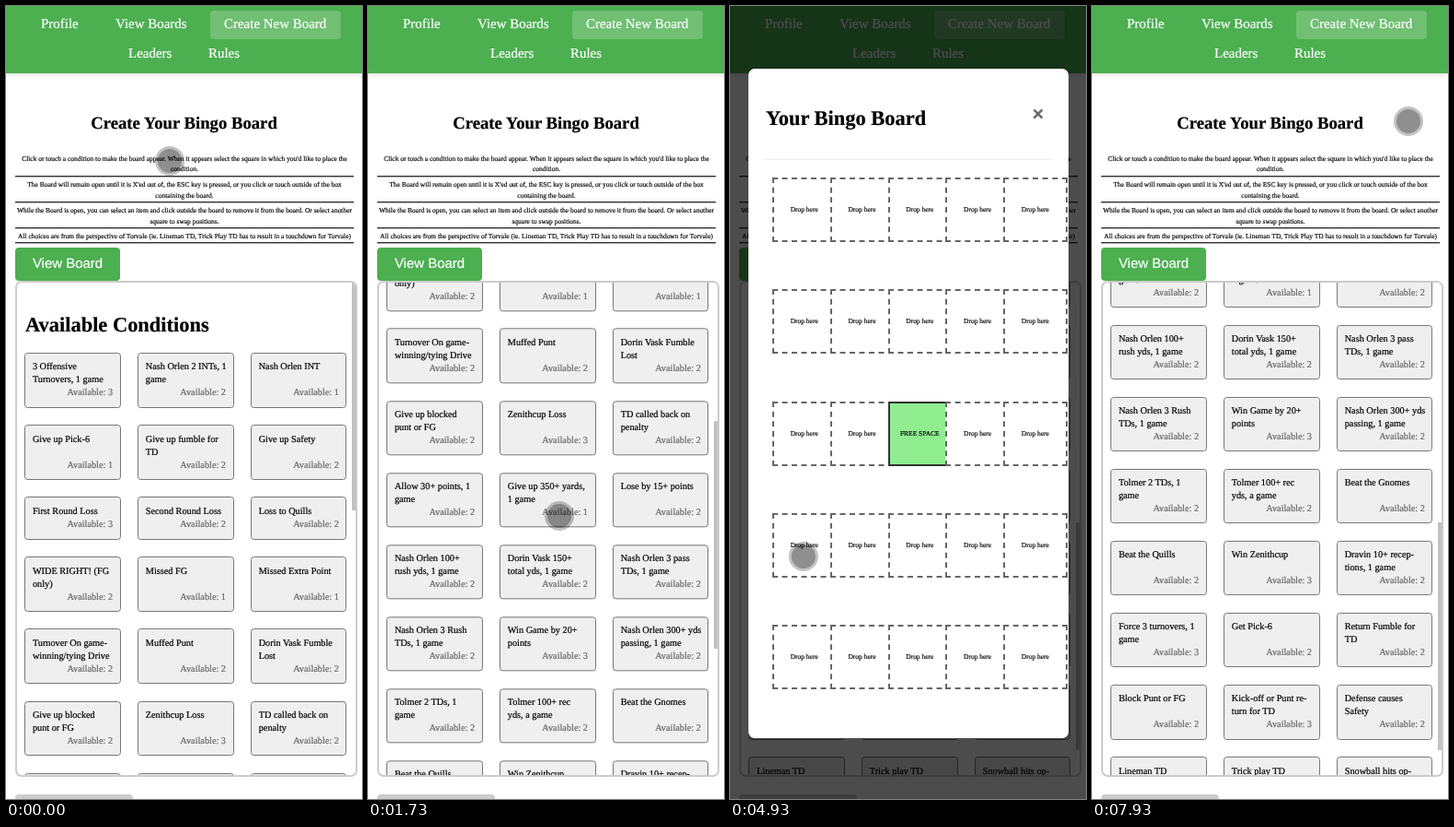
Recreate the animation shown at these times as an HTML page. Size 387x860 px, loop 8 s.

```html
<!DOCTYPE html>
<html lang="en">
<head>
<meta charset="utf-8">
<title>Bingo Board</title>
<style>
@property --scroll { syntax: '<number>'; inherits: true; initial-value: 0; }

* { box-sizing: border-box; margin: 0; padding: 0; }
html, body { width: 100%; height: 100%; overflow: hidden; background: #fff; }
body {
  position: relative;
  font-family: 'Liberation Serif', 'Times New Roman', serif;
  color: #000;
  text-rendering: geometricPrecision;
  -webkit-text-stroke: .2px;
}
#stage { position: absolute; left: 0; top: 0; width: 387px; height: 860px; overflow: hidden; }
#stage div, #stage nav, #stage nav a, #stage h1, #stage h2 { position: absolute; white-space: nowrap; }

nav {
  left: 0; top: 0; width: 387px; height: 73px;
  background: #4caf50; box-shadow: 0 2px 4px rgba(0,0,0,.12);
}
nav a { color: #fff; font-size: 14.96px; line-height: 20px; }
nav .active { left: 222px; top: 5px; width: 142px; height: 31px; border-radius: 4px; background: rgba(255,255,255,.2); }

h1 { left: 0; top: 116px; width: 387px; text-align: center; font-size: 18.7px; line-height: 24px; }
h2 { font-size: 22.44px; line-height: 28px; }

.intro { left: 10px; top: 159.6px; width: 368px; text-align: center; font-size: 7.48px; line-height: 11.7px; color: #111; }
.intro p { padding-bottom: .5px; border-bottom: 1px solid #333; box-shadow: 0 1px #aaa; margin-bottom: 3.3px; }

.view {
  left: 10px; top: 262px; width: 114px; height: 36px; border-radius: 4px;
  background: #4caf50; color: #fff; text-align: center;
  font: 14.96px/36px 'Liberation Sans', Arial, sans-serif;
}
.next { left: 10px; top: 855px; width: 128px; height: 36px; border-radius: 4px; background: #ccc; }

.list {
  left: 10px; top: 298px; width: 372px; height: 538px;
  border: 2px solid #ccc; border-radius: 7px; overflow: hidden;
  animation: scroll 8s infinite linear;
}
.items { left: 0; top: 0; transform: translateY(calc(var(--scroll) * -1px)); }
.items h2 { left: 9px; top: 32px; }
.thumb {
  left: 364px; top: 0; width: 4px; height: 247px; background: #c1c1c1;
  transform: translateY(calc(var(--scroll) * .461px));
}
.card {
  width: 104.6px; padding: 8.3px 0 0 7.8px;
  background: #efefef; border: 1px solid #767676; border-radius: 3.5px;
  font-size: 10.28px; line-height: 14px;
}
#stage .card { white-space: pre; }
.card div { right: 7.6px; bottom: 7.1px; color: #666; }

.overlay {
  left: 0; top: 0; width: 387px; height: 860px; background: rgba(0,0,0,.7);
  animation: modal 8s infinite step-end;
}
.modal { left: 20px; top: 68px; width: 348px; height: 726px; border-radius: 7px; background: #fff; }
.modal h2 { left: 19px; top: 40px; }
.close {
  left: 305px; top: 38px; width: 20px; text-align: center; color: #666;
  font: bold 21px/24px 'Liberation Sans', Arial, sans-serif;
}
.rule { left: 18px; top: 98px; width: 311px; height: 1px; background: #eee; }
.cell {
  width: 69.4px; height: 70px; border: 2px dashed #666; background: #fff;
  text-align: center; font-size: 7.48px; line-height: 66px; color: #111;
}
.free, .placed { border: 2px solid #333; }
.free { background: #90ee90; }
.placed { animation: place 8s infinite; }

.before { animation: before 8s infinite step-end; }
.after { position: absolute; right: 0; animation: after 8s infinite step-end; }

.pointer {
  left: -16px; top: -16px; width: 32px; height: 32px; border-radius: 50%;
  background: radial-gradient(circle, rgba(0,0,0,.44) 12.6px, rgba(0,0,0,.24) 13.4px);
  animation: pointer 8s infinite ease-in-out;
}

@keyframes scroll {
  0%, 15.625% { --scroll: 0; }
  21.625% { --scroll: 325; animation-timing-function: cubic-bezier(.33,.47,.67,1); }
  27.9%, 100% { --scroll: 564; }
}
@keyframes modal {
  0% { visibility: hidden; }
  52.45% { visibility: visible; }
  99.06%, 100% { visibility: hidden; }
}
@keyframes place {
  0%, 74.05% { opacity: 0; background: #fff; }
  74.06% { opacity: 1; background: #fff; }
  78%, 100% { opacity: 1; background: #add8e6; }
}
@keyframes before { 0% { opacity: 1; } 99.06%, 100% { opacity: 0; } }
@keyframes after { 0% { opacity: 0; } 99.06%, 100% { opacity: 1; } }
@keyframes pointer {
  0%, .4% { transform: translate(178px,168px); }
  5%, 11.2% { transform: translate(200px,554px); }
  14.1%, 16% { transform: translate(207px,552px); }
  21.6% { transform: translate(208px,553px); }
  28.4% { transform: translate(206px,557px); }
  35.9%, 41.2% { transform: translate(176px,705px); }
  44.1%, 61% { transform: translate(67px,607px); animation-timing-function: linear; }
  61.6% { transform: translate(79px,597px); animation-timing-function: cubic-bezier(.3,.2,.5,1); }
  68.5% { transform: translate(312px,583px); }
  71.6%, 82.9% { transform: translate(279px,595px); }
  92.5%, 100% { transform: translate(344px,125px); }
}
</style>
</head>
<body>
<div id="stage">
  <nav>
    <div class="active"></div>
    <a style="left:38px;top:10px">Profile</a>
    <a style="left:119px;top:10px">View Boards</a>
    <a style="left:237px;top:10px">Create New Board</a>
    <a style="left:133px;top:42px">Leaders</a>
    <a style="left:220px;top:42px">Rules</a>
  </nav>
  <h1>Create Your Bingo Board</h1>
  <div class="intro">
    <p>Click or touch a condition to make the board appear. When it appears select the square in which you'd like to place the<br>condition.</p>
    <p>The Board will remain open until it is X'ed out of, the ESC key is pressed, or you click or touch outside of the box<br>containing the board.</p>
    <p>While the Board is open, you can select an item and click outside the board to remove it from the board. Or select another<br>square to swap positions.</p>
    <p>All choices are from the perspective of Torvale (ie. Lineman TD, Trick Play TD has to result in a touchdown for Torvale)</p>
  </div>
  <div class="view">View Board</div>
  <div class="list">
    <div class="items"><h2>Available Conditions</h2></div>
    <div class="thumb"></div>
  </div>
  <div class="next"></div>
  <div class="overlay">
    <div class="modal">
      <h2>Your Bingo Board</h2>
      <div class="close">×</div>
      <div class="rule"></div>
    </div>
  </div>
  <div class="pointer"></div>
</div>
<script>
// One row per line; "|" breaks a label, "=" precedes the count.
const conditions = `
3 Offensive|Turnovers, 1 game=3; Nash Orlen 2 INTs, 1|game=2; Nash Orlen INT=1
Give up Pick-6=1; Give up fumble for|TD=2; Give up Safety=2
First Round Loss=3; Second Round Loss=2; Loss to Quills=2
WIDE RIGHT! (FG|only)=2; Missed FG=1; Missed Extra Point=1
Turnover On game-|winning/tying Drive=2; Muffed Punt=2; Dorin Vask Fumble|Lost=2
Give up blocked|punt or FG=2; Zenithcup Loss=3; TD called back on|penalty=2
Allow 30+ points, 1|game=2; Give up 350+ yards,|1 game=1; Lose by 15+ points=2
Nash Orlen 100+|rush yds, 1 game=2; Dorin Vask 150+|total yds, 1 game=2; Nash Orlen 3 pass|TDs, 1 game=2
Nash Orlen 3 Rush|TDs, 1 game=2; Win Game by 20+|points=3; Nash Orlen 300+ yds|passing, 1 game=2
Tolmer 2 TDs, 1|game=2; Tolmer 100+ rec|yds, a game=2; Beat the Gnomes=2
Beat the Quills=3; Win Zenithcup=3; Dravin 10+ recep-|tions, 1 game=2
Force 3 turnovers, 1|game=3; Get Pick-6=2; Return Fumble for|TD=2
Block Punt or FG=2; Kick-off or Punt re-|turn for TD=3; Defense causes|Safety=2
Lineman TD=2; Trick play TD=2; Snowball hits op-|posing player=2`;

const picked = 'Beat the Quills';
const gap = 18.7;

function add(parent, className, left, top, text) {
  const el = document.createElement('div');
  el.className = className;
  el.style.left = left + 'px';
  el.style.top = top + 'px';
  el.textContent = text;
  parent.append(el);
  return el;
}

const items = document.querySelector('.items');
let rowTop = 76.2;
for (const line of conditions.trim().split('\n')) {
  const height = line.includes('|') ? 59.4 : 46.2;
  line.split('; ').forEach((item, col) => {
    const [label, count] = item.split('=');
    const card = add(items, 'card', 8.1 + 122.9 * col, rowTop, label.replace('|', '\n'));
    card.style.height = height + 'px';
    const stock = document.createElement('div');
    stock.innerHTML = 'Available: ' + (label === picked
      ? `<span class="before">${count}</span><span class="after">${count - 1}</span>`
      : count);
    card.append(stock);
  });
  rowTop += height + gap;
}

const modal = document.querySelector('.modal');
for (let row = 0; row < 5; row++) {
  for (let col = 0; col < 5; col++) {
    const x = 26 + 62.8 * col, y = 118 + 121.3 * row;
    const free = row === 2 && col === 2;
    add(modal, free ? 'cell free' : 'cell', x, y, free ? 'FREE SPACE' : 'Drop here');
    if (row === 3 && col === 3) add(modal, 'cell placed', x, y, picked);
  }
}
</script>
</body>
</html>
```
